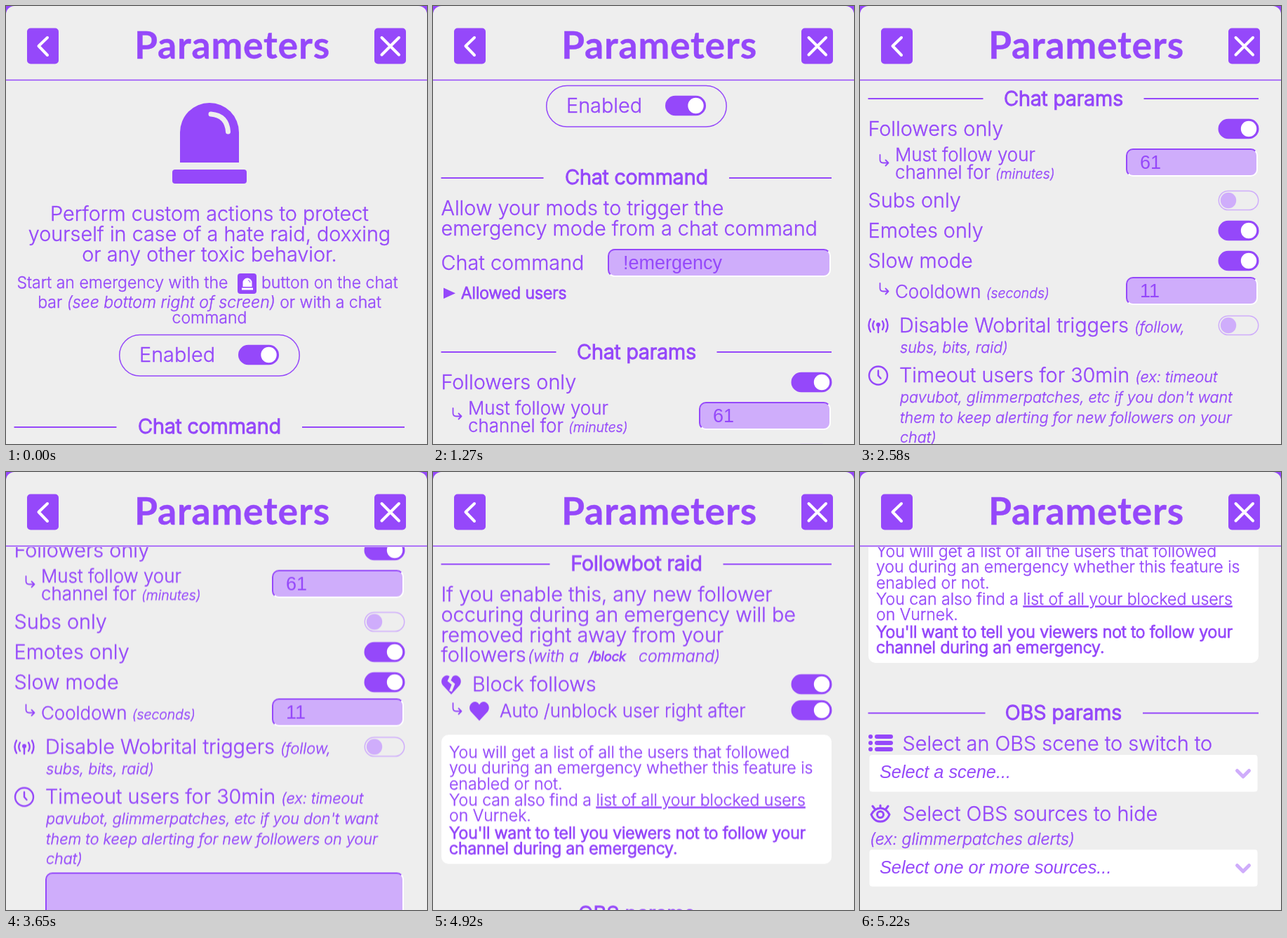
Write an HTML page that moves like this. It is 600x624 px and loops after 6.22 s.

```html
<!DOCTYPE html>
<html lang="en">
<head>
<meta charset="utf-8">
<title>Parameters</title>
<style>
  :root { --main: #9548fa; --pale: #cfadfb; --paper: #eeeeee; }
  html, body { margin: 0; width: 100%; height: 100%; overflow: hidden; background: var(--main); }
  .panel { position: absolute; left: 0; top: 0; width: 600px; height: 624px; overflow: hidden;
    background: var(--paper); border-radius: 12px 12px 0 0; }
  .view { position: absolute; left: 0; top: 107px; width: 600px; height: 517px; overflow: hidden; }
  .page { position: absolute; left: 0; top: -107px; width: 600px; height: 2300px;
    animation: scroll 6220ms linear -1ms infinite; }
  svg { position: absolute; left: 0; top: 0; display: block; }

  /* Each scroll advances once every 30 ms, starting with a step. */
  @keyframes scroll {
    0% { transform: translateY(0); }
    16.5595% { transform: translateY(0); animation-timing-function: steps(9, start); }
    20.9003% { transform: translateY(-355px); }
    37.6206% { transform: translateY(-355px); animation-timing-function: steps(9, start); }
    41.9614% { transform: translateY(-716px); }
    58.6817% { transform: translateY(-716px); animation-timing-function: steps(10, start); }
    63.5048% { transform: translateY(-1351px); }
    79.0997% { transform: translateY(-1351px); animation-timing-function: steps(11, start); }
    84.4051% { transform: translateY(-1666px); }
    100% { transform: translateY(-1666px); }
  }

  .field { position: absolute; box-sizing: border-box; background: var(--pale);
    border: 2px solid; border-color: var(--main) #fff #fff var(--main); border-radius: 10px; }
  text { font: 300 28.8px Inter, sans-serif; font-optical-sizing: none; fill: var(--main);
    stroke: var(--main); stroke-width: .35; white-space: pre; }
  .title { font: 700 53.5px Lato, sans-serif; letter-spacing: .8px; stroke-linejoin: round; }
  .mid { text-anchor: middle; }
  .sub { font-size: 25.9px; }
  .small { font-size: 23.04px; }
  .note { font-size: 21.6px; }
  .tiny { font-size: 19.4px; }
  .code { font-size: 18.4px; }
  .it { font-style: italic; }
  .bold { stroke-width: 1.4; }
  .small.bold, .code.bold { stroke-width: 1.1; }
  .value { font: 400 27px "Liberation Sans", Arial, sans-serif; stroke: none; }
  .pick { font: italic 400 25.3px "Liberation Sans", Arial, sans-serif; stroke: none; }
  .link { text-decoration: underline; text-decoration-thickness: 1.5px; }
  .fill { fill: var(--main); }
  .line { fill: none; stroke: var(--main); stroke-width: 1.5; }
  .rule { stroke: var(--main); stroke-width: 1.8; }
  .icon { fill: none; stroke: var(--main); stroke-width: 2.4; stroke-linecap: round; stroke-linejoin: round; }
  .thick { stroke-width: 3; }
  .pale { fill: var(--pale); }
  .ring { fill: none; stroke: var(--pale); stroke-width: 1.5; }
  .white { fill: #fff; }
  .cut { fill: none; stroke: var(--paper); }
</style>
</head>
<body>
<div class="panel">
  <div class="view">
    <div class="page">
      <div class="field" style="left:249px;top:701px;width:318px;height:40px"></div>
      <div class="field" style="left:379px;top:919px;width:188px;height:40px"></div>
      <div class="field" style="left:379px;top:1102px;width:188px;height:40px"></div>
      <div class="field" style="left:56px;top:1350px;width:511px;height:88px"></div>

      <svg width="600" height="2300" viewBox="0 0 600 2300">
        <defs>
          <g id="on">
            <rect class="fill" x="-29" y="-14.3" width="58" height="28.6" rx="14.3"/>
            <circle class="white" cx="14.5" r="11.2"/>
          </g>
          <g id="off">
            <rect class="ring" x="-28.2" y="-13.6" width="56.4" height="27.2" rx="13.6"/>
            <circle class="pale" cx="-14.5" r="11.2"/>
          </g>
          <path id="turn" class="icon" style="stroke-width:1.8" d="M0 0V7Q0 11.5 4.5 11.5H12M8 7.5L12 11.5L8 15.5"/>
          <path id="heart" d="M0 14L-12 1C-17 -6 -11 -14 -5 -13Q-2 -12.5 0 -9Q2 -12.5 5 -13C11 -14 17 -6 12 1Z"/>
          <path id="down" d="M-8.5 -4.5L0 4L8.5 -4.5" fill="none" stroke="#cfadfb" stroke-width="5" stroke-linecap="round" stroke-linejoin="round"/>
        </defs>

        <!-- Introduction -->
        <path class="fill" d="M248 223V180A42 42 0 0 1 332 180V223Z"/>
        <path class="cut" d="M292 154Q315 156 316.5 179" stroke-width="7" stroke-linecap="round"/>
        <rect class="fill" x="237" y="233" width="106" height="20" rx="4"/>
        <text class="mid" x="290" y="306">Perform custom actions to protect</text>
        <text class="mid" x="290" y="335">yourself in case of a hate raid, doxxing</text>
        <text class="mid" x="290" y="363.5">or any other toxic behavior.</text>
        <text class="small" x="15.5" y="402">Start an emergency with the</text>
        <rect class="fill" x="330" y="381" width="27" height="29" rx="4"/>
        <path class="white" d="M337.5 400V394A6.5 6.5 0 0 1 350.5 394V400ZM336 401.5H352V404.5H336Z"/>
        <path class="line" d="M345 390.5Q347.5 391 348 394" style="stroke-width:1"/>
        <text class="small" x="364" y="402">button on the chat</text>
        <text class="small mid" x="290" y="429.5">bar <tspan class="it">(see bottom right of screen)</tspan> or with a chat</text>
        <text class="small mid" x="290" y="452">command</text>
        <rect class="line" x="161.7" y="468.5" width="256.5" height="58.5" rx="29.2"/>
        <text x="190" y="507">Enabled</text>
        <use href="#on" x="360" y="497"/>

        <!-- Chat command -->
        <path class="rule" d="M11.5 600H157.5M422 600H568"/>
        <text class="mid bold" x="290" y="609">Chat command</text>
        <text x="11.5" y="652.5">Allow your mods to trigger the</text>
        <text x="11.5" y="681.5">emergency mode from a chat command</text>
        <text x="11.5" y="731">Chat command</text>
        <text class="value" x="271" y="730">!emergency</text>
        <path class="fill" d="M15 756.5L32 764.3L15 772Z"/>
        <text class="small bold" x="40" y="772.3">Allowed users</text>

        <!-- Chat params -->
        <path class="rule" d="M11.5 848H175.5M404.5 848H568"/>
        <text class="mid bold" x="290" y="857.5">Chat params</text>
        <text x="11.5" y="901">Followers only</text>
        <use href="#on" x="539.5" y="891"/>
        <use href="#turn" x="28.5" y="928"/>
        <text class="sub" x="50" y="937">Must follow your</text>
        <text class="sub" x="50" y="962">channel for <tspan class="tiny it">(minutes)</tspan></text>
        <text class="value" x="399" y="947.5">61</text>
        <text x="11.5" y="1003">Subs only</text>
        <use href="#off" x="539.5" y="993"/>
        <text x="11.5" y="1046">Emotes only</text>
        <use href="#on" x="539.5" y="1036"/>
        <text x="11.5" y="1089">Slow mode</text>
        <use href="#on" x="539.5" y="1079"/>
        <use href="#turn" x="28.5" y="1111"/>
        <text class="sub" x="50" y="1131.5">Cooldown <tspan class="tiny it">(seconds)</tspan></text>
        <text class="value" x="399" y="1130.5">11</text>
        <g transform="translate(26 1171)">
          <path class="icon" d="M-11 -9Q-16 0 -11 9M-6 -6Q-9.5 0 -6 6M11 -9Q16 0 11 9M6 -6Q9.5 0 6 6M0 0V10"/>
          <circle class="fill" cy="-1" r="3"/>
        </g>
        <text x="56" y="1181">Disable Wobrital triggers <tspan class="note it">(follow,</tspan></text>
        <text class="note it" x="57" y="1210">subs, bits, raid)</text>
        <use href="#off" x="539.5" y="1171"/>
        <g class="icon" transform="translate(26 1242.5)">
          <circle r="13"/><path d="M0 -7V0L3.5 4"/>
        </g>
        <text x="56" y="1252">Timeout users for 30min <tspan class="note it">(ex: timeout</tspan></text>
        <text class="note it" x="57" y="1281">pavubot, glimmerpatches, etc if you don't want</text>
        <text class="note it" x="57" y="1309.5">them to keep alerting for new followers on your</text>
        <text class="note it" x="57" y="1338">chat)</text>

        <!-- Followbot raid -->
        <path class="rule" d="M11.5 1511H166.5M413.5 1511H568"/>
        <text class="mid bold" x="290" y="1520">Followbot raid</text>
        <text x="11.5" y="1564">If you enable this, any new follower</text>
        <text x="11.5" y="1592.5">occuring during an emergency will be</text>
        <text x="11.5" y="1621.5">removed right away from your</text>
        <text x="11.5" y="1650">followers</text>
        <text class="small it" x="135" y="1650">(with a</text>
        <text class="code it bold" x="222" y="1648.5">/block</text>
        <text class="small it" x="293" y="1650">command)</text>
        <use href="#heart" class="fill" x="26" y="1682.5"/>
        <path class="cut" d="M27 1668L23 1677L29 1682L25 1692" stroke-width="4"/>
        <text x="56" y="1692">Block follows</text>
        <use href="#on" x="539.5" y="1682"/>
        <use href="#turn" x="28.5" y="1709"/>
        <use href="#heart" class="fill" x="66" y="1720"/>
        <text class="sub" x="95" y="1728.5">Auto /unblock user right after</text>
        <use href="#on" x="539.5" y="1719"/>
        <rect class="white" x="12" y="1754" width="556" height="184" rx="10"/>
        <text class="small" x="23" y="1786.5">You will get a list of all the users that followed</text>
        <text class="small" x="23" y="1809">you during an emergency whether this feature is</text>
        <text class="small" x="23" y="1831.5">enabled or not.</text>
        <text class="small" x="23" y="1854.5">You can also find a <tspan class="link">list of all your blocked users</tspan></text>
        <text class="small" x="23" y="1877">on Vurnek.</text>
        <text class="small bold" x="23" y="1901.5">You'll want to tell you viewers not to follow your</text>
        <text class="small bold" x="23" y="1924">channel during an emergency.</text>

        <!-- OBS params -->
        <path class="rule" d="M11.5 2009.5H178.5M403 2009.5H568"/>
        <text class="mid bold" x="290" y="2019">OBS params</text>
        <path class="icon" style="stroke-width:6" d="M15 2043H15.1M15 2052H15.1M15 2061H15.1M24 2043H44M24 2052H44M24 2061H44"/>
        <text x="60.5" y="2063">Select an OBS scene to switch to</text>
        <rect class="white" x="13.5" y="2069" width="553" height="52.5" rx="4"/>
        <text class="pick" x="28" y="2102">Select a scene...</text>
        <use href="#down" x="546" y="2096"/>
        <g transform="translate(29 2154)">
          <path class="icon thick" d="M-13 0Q-8 -9 0 -9T13 0Q9 10 0 10T-13 0ZM-8 -8L-11 -12M0 -9V-13M8 -8L11 -12"/>
          <circle class="icon thick" r="4.5"/>
        </g>
        <text x="60.5" y="2162.5">Select OBS sources to hide</text>
        <text class="small it" x="14" y="2197">(ex: glimmerpatches alerts)</text>
        <rect class="white" x="13.5" y="2204" width="553" height="52.5" rx="4"/>
        <text class="pick" x="28" y="2237.5">Select one or more sources...</text>
        <use href="#down" x="546" y="2231"/>
      </svg>
    </div>
  </div>

  <svg width="600" height="107" viewBox="0 0 600 107">
    <rect class="fill" x="30" y="31.5" width="45" height="51" rx="5"/>
    <rect class="fill" x="525" y="31.5" width="45" height="51" rx="5"/>
    <g fill="none" stroke="#fff" stroke-width="4" stroke-linecap="round" stroke-linejoin="round">
      <path d="M59 45L46.5 57L59 70"/>
      <path d="M535.5 45L560 69.5M560 45L535.5 69.5"/>
    </g>
    <text class="title mid" x="322.5" y="75">Parameters</text>
    <path class="line" d="M0 105.5H600"/>
  </svg>
</div>
</body>
</html>
```
